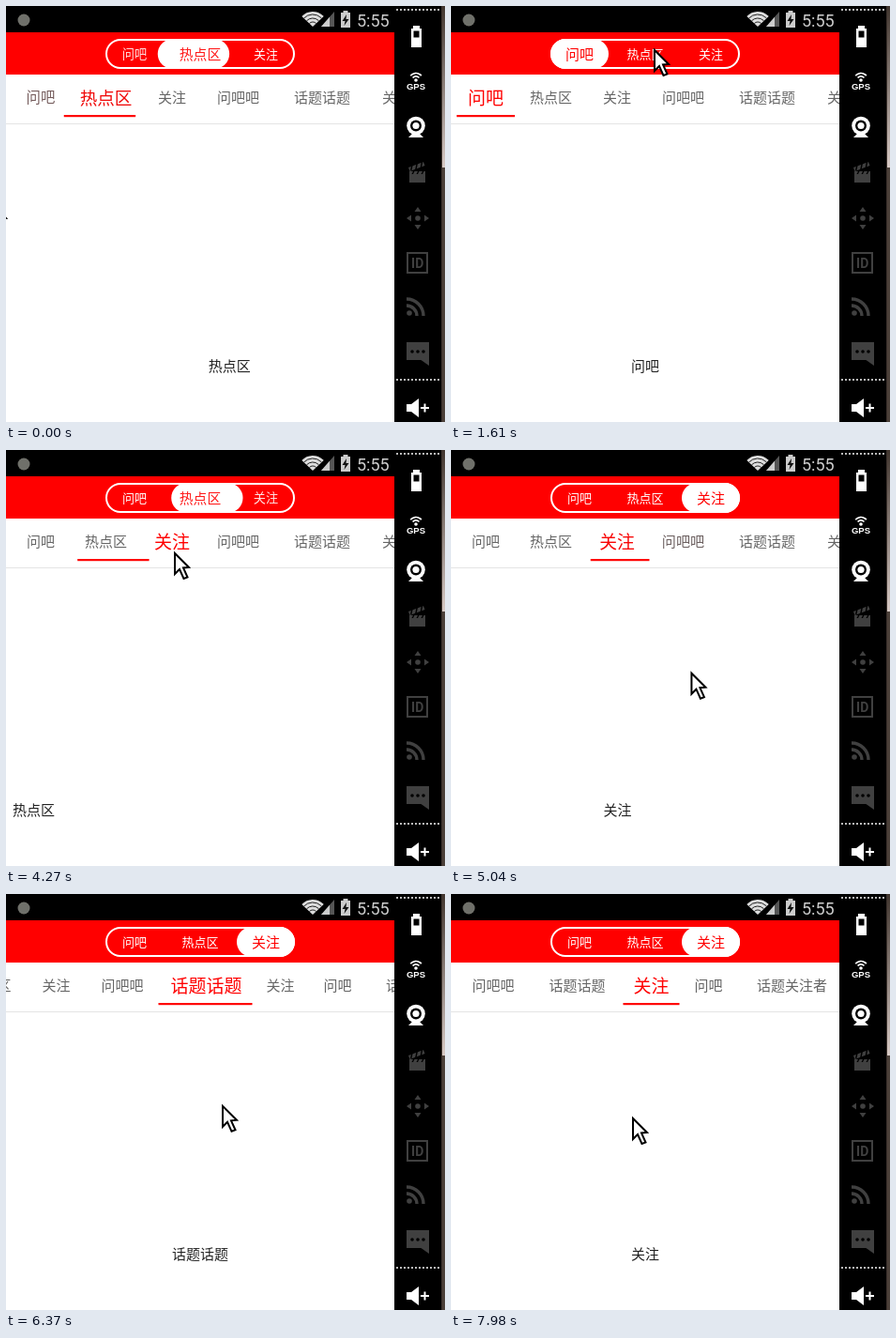
Animation of 468 by 443 pixels, one loop 8000 ms. Source, as an HTML page with a canvas:

```html
<!DOCTYPE html>
<html lang="zh">
<head>
<meta charset="utf-8">
<title>Tab pager</title>
<style>
html, body { margin: 0; width: 100%; height: 100%; overflow: hidden; background: #000; }
canvas { display: block; width: 468px; height: 443px; }
</style>
</head>
<body>
<canvas id="stage" width="468" height="443"></canvas>
<script>
const ctx = document.getElementById('stage').getContext('2d');
const LOOP = 8000, HOLD = 70, PAGE = 414;
const CJK = '"Noto Sans CJK SC", "Noto Sans CJK", sans-serif';
const GRAY = [102, 102, 102], RED = [255, 0, 0], WHITE = [255, 255, 255];

const tabs = [
  ['问吧', 37], ['热点区', 106.5], ['关注', 177], ['问吧吧', 247.5],
  ['话题话题', 337], ['关注', 416], ['问吧', 477], ['话题关注者', 566]
];
const tabEdges = [6, 68, 146, 208, 286, 386, 446];
const pills = [['问吧', 137], ['热点区', 207], ['关注', 277]];
const pillEdges = [106, 168, 246, 308];

const linear = u => u;
const settle = u => 1 - (1 - u) ** 5;

// Pager moves: start, duration, page, easing, indicator lag, started by a click
const moves = [
  [-101, 250, 1, settle, 9],
  [640, 350, 0.55, linear, 15],
  [990, 300, 0, settle, 15],
  [1965, 250, 1, settle, 20, true],
  [2999, 250, 0, settle, 34, true],
  [3709, 250, 1, settle, 20, true],
  [4243.5, 250, 2, settle, 21, true],
  [5000, 280, 2.5, linear, 15],
  [5280, 300, 3, settle, 15],
  [5670, 210, 3.453, linear, 4],
  [5880, 300, 4, settle, 15],
  [6720, 210, 4.693, linear, 20],
  [6930, 300, 5, settle, 20]
];

// The strip centres a tab when its page is picked: start, tab
const centrings = [[5280, 3], [5880, 4], [6931, 5]];

// Pointer path: time, x, y
const path = [
  [70, -16, 209], [490, 100, 232], [640, 100, 232], [990, 286, 250],
  [1130, 380, 258], [1400, 266, 250], [1610, 216, 45], [1820, 210, 46],
  [2300, 210, 46], [2800, 18, 100], [3150, 18, 100], [3360, 100, 104],
  [3850, 100, 104], [4060, 179, 108], [4620, 179, 108], [4970, 285, 235],
  [5000, 285, 235], [5280, 78, 240], [5600, 204, 236], [5670, 204, 236],
  [5880, 17, 234], [6600, 330, 219], [6720, 330, 219], [6930, 43, 217],
  [7000, 20, 218], [7770, 129, 237], [7840, 129, 237], [7980, 193, 237]
];

const mix = (a, b, u) => a + (b - a) * u;
const clamp = (v, lo = 0, hi = 1) => Math.min(hi, Math.max(lo, v));
const blend = (a, b, u) => `rgb(${a.map((v, i) => Math.round(mix(v, b[i], u)))})`;

function pagePos(t, lagged) {
  let p = 0;
  for (const [start, dur, to, ease, lag] of moves) {
    const u = clamp((t - start - (lagged ? lag : 0)) / dur);
    p = mix(p, to, ease(u));
  }
  return p;
}

function stripScroll(t) {
  return centrings.reduce((x, [start, k]) => {
    const u = clamp((t - start) / 250);
    return mix(x, tabs[k][1] - 213.5, 1 - (1 - u) ** 3);
  }, 0);
}

function clickedTab(t) {
  const m = moves.find(([s, d, , , lag, click]) => click && t >= s && t < s + d + lag);
  return m ? m[2] : -1;
}

function pointer(t) {
  const i = path.findIndex(k => k[0] > t);
  if (i === 0) return path[0].slice(1);
  if (i < 0) return path[path.length - 1].slice(1);
  const a = path[i - 1], b = path[i], u = (t - a[0]) / (b[0] - a[0]);
  return [mix(a[1], b[1], u), mix(a[2], b[2], u)];
}

function span(edges, q) {
  const k = Math.min(Math.floor(q), edges.length - 2), u = q - k;
  const at = i => edges[Math.min(i, edges.length - 1)];
  const left = mix(at(k), at(k + 1), u);
  return [left, mix(at(k + 1), at(k + 2), u) - left];
}

function rect(color, x, y, w, h) {
  ctx.fillStyle = color;
  ctx.fillRect(x, y, w, h);
}

function disc(color, x, y, r) {
  ctx.fillStyle = color;
  ctx.beginPath();
  ctx.arc(x, y, r, 0, Math.PI * 2);
  ctx.fill();
}

function poly(color, ...pts) {
  ctx.fillStyle = color;
  ctx.beginPath();
  for (let i = 0; i < pts.length; i += 2) ctx.lineTo(pts[i], pts[i + 1]);
  ctx.closePath();
  ctx.fill();
}

function arc(color, x, y, r, from, to, width) {
  ctx.strokeStyle = color;
  ctx.lineWidth = width;
  ctx.beginPath();
  ctx.arc(x, y, r, from * Math.PI, to * Math.PI);
  ctx.stroke();
}

function roundBox(x, y, w, h, r) {
  ctx.beginPath();
  ctx.roundRect(x, y, w, h, r);
}

function text(str, x, y, font, color, align = 'center') {
  ctx.font = font;
  ctx.fillStyle = color;
  ctx.textAlign = align;
  ctx.fillText(str, x, y);
}

// Places characters by their visual middle
const han = (str, x, cy, size, color) =>
  text(str, x, cy + size * 0.38, `${size}px ${CJK}`, color);

function statusBar() {
  rect('#000', 0, 0, PAGE, 28);
  disc('#6f706a', 19, 15, 6.5);

  ctx.fillStyle = '#ddd';
  ctx.beginPath();
  ctx.moveTo(327, 22);
  ctx.arc(327, 22, 16, -0.76 * Math.PI, -0.24 * Math.PI);
  ctx.fill();
  for (const r of [5, 9, 13]) arc('#222', 327, 22, r, -0.76, -0.24, 1);

  poly('#555', 336, 22, 350, 6, 350, 22);
  poly('#ccc', 336, 22, 345, 11.7, 345, 22);

  rect('#ccc', 359.5, 5, 5, 3);
  rect('#ccc', 357, 7, 10, 16);
  poly('#111', 363, 9, 358.5, 16, 361.5, 16, 360.5, 21, 365.5, 14, 362.5, 14);
  text('5:55', 374, 21.5, '18px Roboto, sans-serif', '#ccc', 'left');
}

function header(q) {
  rect('#f00', 0, 28, PAGE, 45);
  ctx.strokeStyle = '#fff';
  ctx.lineWidth = 2;
  roundBox(107, 36, 200, 30, 15);
  ctx.stroke();

  const pos = Math.min(q, 2), [x, w] = span(pillEdges, pos);
  ctx.fillStyle = '#fff';
  roundBox(x, 35, w, 32, 16);
  ctx.fill();
  pills.forEach(([name, cx], k) => {
    const on = clamp(1 - Math.abs(pos - k));
    han(name, cx, 51, 13 + 2 * on, blend(WHITE, RED, on));
  });
}

function strip(t, q) {
  const shift = stripScroll(t), picked = clickedTab(t);
  rect('#e4e4e4', 0, 125, PAGE, 1);
  ctx.save();
  ctx.translate(-shift, 0);
  const [x, w] = span(tabEdges, q);
  rect('#f00', x, 116, w, 2.2);
  tabs.forEach(([name, cx], k) => {
    const on = picked < 0 ? clamp(1 - Math.abs(q - k)) : +(picked === k);
    han(name, cx, 97.5, 15 + 4 * on, blend(GRAY, RED, on));
  });
  ctx.restore();
}

function pages(p) {
  tabs.slice(0, 6).forEach(([name], k) => {
    const x = PAGE / 2 + (k - p) * PAGE;
    if (x > -60 && x < PAGE + 60) han(name, x, 383.3, 15, '#222');
  });
}

function cursor(t) {
  const [x, y] = pointer(t);
  ctx.save();
  ctx.translate(x, y);
  ctx.lineJoin = 'miter';
  poly('#fff', 1, 2, 1, 24, 6, 19, 10.5, 29, 14.5, 27.5, 10, 17.5, 16, 17);
  ctx.strokeStyle = '#000';
  ctx.lineWidth = 2;
  ctx.stroke();
  ctx.restore();
}

function sidePanel() {
  const dim = '#404040', lit = '#fff';
  rect('#000', PAGE, 0, 54, 443);
  const edge = ctx.createLinearGradient(0, 0, 0, 172);
  edge.addColorStop(0, '#40352e');
  edge.addColorStop(1, '#d6c9c4');
  rect('#3a302b', 464, 0, 2, 443);
  rect(edge, 465, 0, 3, 172);
  rect('#4b4039', 465, 172, 3, 271);
  for (let x = 416; x < 463; x += 4) {
    rect('#bbb', x, 3, 2, 2);
    rect('#bbb', x, 397, 2, 2);
  }

  // Battery
  rect(lit, 434, 21, 7, 4);
  rect(lit, 432, 24, 11, 20);
  rect('#000', 434.5, 26.5, 6, 7);

  // Positioning
  disc(lit, 437, 79, 1.8);
  arc(lit, 437, 79, 4.2, -0.8, -0.2, 1.7);
  arc(lit, 437, 79, 7.5, -0.78, -0.22, 1.7);
  text('GPS', 437, 89, 'bold 9.5px "Liberation Sans", Arial, sans-serif', lit);

  // Webcam
  disc(lit, 437, 127.5, 9.8);
  disc('#000', 437, 127.5, 6);
  disc(lit, 437, 127.5, 3.6);
  poly(lit, 433, 136, 441, 136, 445, 140, 429, 140);

  // Clapperboard
  rect(dim, 430, 176, 17, 12);
  poly(dim, 429, 172, 445, 166, 446.5, 170, 430.5, 176);
  for (const x of [433, 438, 443]) poly('#000', x, 165, x + 1.5, 165, x - 0.5, 175, x - 2, 175);
  for (const x of [434, 439, 444]) poly('#000', x, 176, x + 1.5, 176, x, 179, x - 1.5, 179);

  // Direction pad
  disc(dim, 439, 226, 2.8);
  for (let i = 0; i < 4; i++) {
    ctx.save();
    ctx.translate(439, 226);
    ctx.rotate(i * Math.PI / 2);
    poly(dim, 0, -12, 3.5, -7, -3.5, -7);
    ctx.restore();
  }

  // Identity
  ctx.strokeStyle = dim;
  ctx.lineWidth = 2;
  ctx.strokeRect(428, 263, 21, 21);
  text('ID', 438.7, 279, 'bold 14px Roboto, sans-serif', dim);

  // Feed
  disc(dim, 430, 327, 2.8);
  arc(dim, 427, 330, 11, -0.5, 0, 3.4);
  arc(dim, 427, 330, 18, -0.5, 0, 3.4);

  // Message
  rect(dim, 427, 358, 24, 19);
  poly(dim, 441, 376, 451, 376, 451, 383);
  for (const x of [433, 439, 445]) disc('#000', x, 368, 1.8);

  // Volume
  poly(lit, 427, 424, 432, 424, 440, 418, 440, 438, 432, 432, 427, 432);
  rect(lit, 442, 427, 9, 2);
  rect(lit, 445.5, 423.5, 2, 9);
}

function draw(t) {
  const p = pagePos(t), q = pagePos(t, true);
  rect('#fff', 0, 0, PAGE, 443);
  strip(t, q);
  pages(p);
  header(q);
  statusBar();
  cursor(t);
  sidePanel();
}

const begin = performance.now();
function tick() {
  const t = (performance.now() - begin) % LOOP;
  draw(Math.floor(t / HOLD) * HOLD);
  requestAnimationFrame(tick);
}
tick();
</script>
</body>
</html>
```
